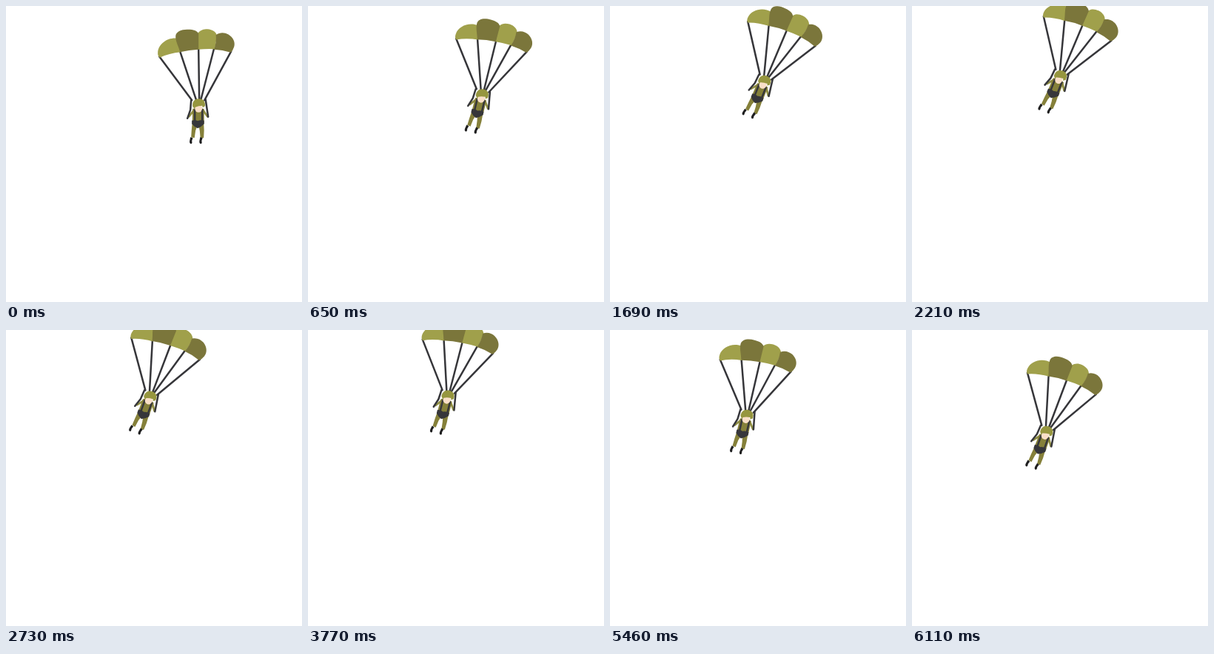
Write an HTML page that moves like this. It is 400 by 400 pixels and loops after 6.24 s.

```html
<!DOCTYPE html>
<html lang="en">
<head>
<meta charset="utf-8">
<title>Parachutist</title>
<style>
  html, body { margin: 0; width: 100%; height: 100%; overflow: hidden; background: #fff; }
  svg { display: block; width: 100vw; height: 100vh; }
  .light { fill: #a0a04b; }
  .dark { fill: #7b763b; }
  .suit { fill: #85803a; }
  .gear { fill: #36363a; }
  .boot { fill: #1f1f20; }
  .face { fill: #f9dfc8; }
  .helmet { fill: #96963f; }
  .cord, .strap, .sleeve { fill: none; stroke: #36363a; stroke-width: 2.5; stroke-linecap: round; stroke-linejoin: round; }
  .sleeve { stroke: #908f43; stroke-width: 2.8; }
</style>
</head>
<body>
<svg viewBox="0 0 400 400">
  <defs>
    <path id="boot" class="boot" d="M-1.500 -5L1.800 -4L.5 0Q1.500 4 -.8 4Q-3 3.500 -2.500 0Z"/>
  </defs>
  <!-- the origin is the centre of the head -->
  <g id="jumper">
    <path class="cord" d="M-53 -64L-9 -5M-25 -71L-3 -5M0 -75L1 -5M21 -75L3 -5M44 -71L8 -5"/>

    <g id="canopy">
      <path class="light" d="M-52.500 -62.500Q-55.500 -65 -55 -70C-54 -81 -42 -90.500 -28 -88.500L-24 -70Q-40 -68.500 -52.500 -62.500Z"/>
      <path class="light" d="M-1 -95C2 -100 7 -101 12 -101C19 -100.500 24 -97 25 -92L22 -74Q11 -74.500 -1 -73.500Z"/>
      <path class="dark" d="M-25 -70C-27 -78 -31 -84 -31 -91C-31 -98 -22 -101 -14 -100.500C-7 -100.500 -2 -99 0 -95L0 -73.500Q-13 -73 -25 -70Z"/>
      <path class="dark" d="M23.500 -93C29 -97 35 -96.500 40 -94C47 -90 50 -83 48 -77Q46.500 -72 43.500 -69.500Q32 -73 21 -73.500Q24.500 -84 23.500 -93Z"/>
    </g>

    <g id="body">
      <path class="suit" d="M-8.500 26L-1 28L-4 36L-5.500 46L-10 45Q-9.500 35 -8.500 26ZM0 28L7 26Q8 36 7 46L2.500 46Q2 36 0 28Z"/>
      <use href="#boot" x="-9.500" y="50"/>
      <use href="#boot" x="3.700" y="50"/>
      <path class="sleeve" d="M-6.500 9L-13 17M6.500 9L12 17"/>
      <path class="cord" d="M-10 -5L-11 8L-15 19.500M9.500 -6L11 4L13 17.500"/>
      <path class="suit" d="M-8 7Q-1 3 7.500 7L7.500 27L-8.500 27Z"/>
      <path class="strap" d="M-5 8V24M5 8V24"/>
      <path class="gear" d="M-9 22.500Q-5 21 -1 23Q3 21 7.500 22.500V27Q4 31 -1 33Q-6 31 -9 27Z"/>
      <ellipse class="face" cx="0" cy="6" rx="5" ry="5.500"/>
      <path class="helmet" d="M-8 3.500C-8.800 -3 -5 -7 .5 -7C6.500 -7 9.500 -3 8.700 3L5.700 5L5 2.500Q0 2.500 -4.500 4.500L-5 7Z"/>
    </g>
  </g>
</svg>
<script>
  const LOOP = 6240, STEP = 130;
  const BODY_LAG = 0.1;
  const jumper = document.getElementById('jumper');
  const body = document.getElementById('body');

  // Smooth flight path; t in seconds, tilt in degrees
  function pose(t) {
    const late = 4.6 - t, low = t - 3.35;
    const lift = 4 + 0.41 * t + 0.18 * Math.sin(2000 * Math.PI * t / LOOP);
    return {
      x: 187 + 1.9 * late + 0.662 * late ** 3,
      y: 87.4 + lift * low ** 2,
      tilt: t * (2.35 + 1.04 * (t - 5.05) ** 2)
    };
  }

  function draw(time) {
    const t = Math.floor((time % LOOP) / STEP) * STEP / 1000;
    const { x, y, tilt } = pose(t);
    jumper.setAttribute('transform', `translate(${x} ${y}) rotate(${tilt})`);
    body.setAttribute('transform', `rotate(${-BODY_LAG * tilt})`);
  }

  const start = performance.now();
  function tick() {
    draw(performance.now() - start);
    requestAnimationFrame(tick);
  }
  tick();
</script>
</body>
</html>
```
